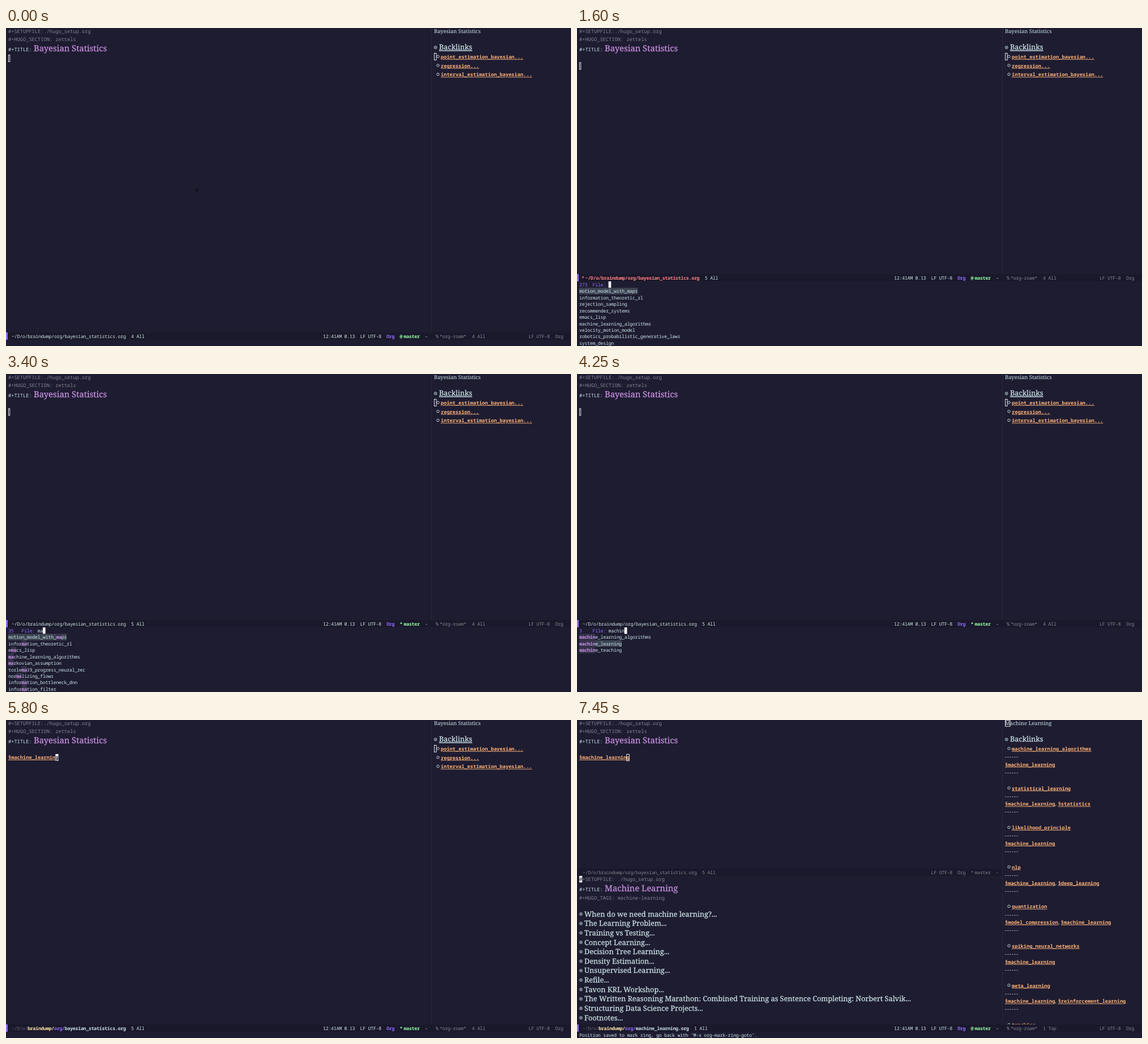
These frames come from a looping animation (998x561 px, 8.85 s). An HTML page:

```html
<!DOCTYPE html>
<html lang="en">
<head>
<meta charset="utf-8">
<title>Linking notes</title>
<style>
  html, body { margin: 0; width: 100%; height: 100%; overflow: hidden; background: #1e1c31; }
  svg { display: block; }
  #stage { width: 100%; height: 100%; }
  text { white-space: pre; fill: currentColor; color: #cbe3e7; text-rendering: geometricPrecision; }
  .code { font: 8.68px "Noto Sans Mono", monospace; }
  .ui { font: 8.3px "Noto Sans Mono", monospace; letter-spacing: -.29px; }
  .serif { font: 9.45px "Noto Serif", serif; }
  .rule { font: 9.45px "Noto Serif", serif; letter-spacing: 1.12px; }
  .head { font: 12.7px "Noto Serif", serif; stroke: currentColor; stroke-width: .25px; }
  .title { font: 14.8px "Noto Serif", serif; stroke: currentColor; stroke-width: .25px; }
  .bold { font-weight: 700; }
  .link { font-weight: 700; color: #ffb378; text-decoration: underline; text-decoration-skip-ink: none; }
  .line { text-decoration: underline; text-decoration-thickness: .7px; }
  .dim { color: #858392; }
  .faint { color: #636075; }
  .mauve { color: #c991e1; }
  .violet { color: #906cff; }
  .green { color: #95ffa4; }
  .yellow { color: #ffe9aa; }
  .red { color: #ff8080; }
  .dark { color: #1e1c31; }
  tspan { fill: currentColor; }
</style>
</head>
<body>
<svg id="stage" viewBox="0 0 998 561">
  <defs>
    <linearGradient id="glow">
      <stop offset="0" stop-color="#7f7f7f"/>
      <stop offset="1" stop-color="#1e1c31"/>
    </linearGradient>
  </defs>
</svg>
<script>
const LOOP = 8850;
const T = { newline: 50, prompt: 950, saved: 2400, type: 3300, insert: 4300, normal: 5600, open: 6050 };
const BG = '#1e1c31', BAR = '#1a182b', FG = '#cbe3e7', WHITE = '#f4f6f8';
const UI = 4.69, CODE = 5.208, ROW = 11.45;

const stage = document.getElementById('stage');
const scenes = [];

function el(parent, tag, attrs) {
  const node = document.createElementNS('http://www.w3.org/2000/svg', tag);
  for (const k in attrs) node.setAttribute(k, attrs[k]);
  parent.appendChild(node);
  return node;
}

// A group that is visible from one time to another
function scene(from, to) {
  const g = el(stage, 'g', {});
  scenes.push({ g, from, to });
  return g;
}

// content: a string, or a list of [class, string] runs
function text(g, x, y, cls, content) {
  const node = el(g, 'text', { x, y, class: cls });
  if (typeof content === 'string') node.textContent = content;
  else for (const [c, s] of content) el(node, 'tspan', { class: c }).textContent = s;
}

const rect = (g, x, y, width, height, fill) => el(g, 'rect', { x, y, width, height, fill });
const frame = (g, x, y, width, height) =>
  el(g, 'rect', { x, y, width, height, fill: 'none', stroke: WHITE, 'stroke-width': .9 });
const ring = (g, cx, cy, r) =>
  el(g, 'circle', { cx, cy, r, fill: 'none', stroke: FG, 'stroke-width': .9 });

function bullet(g, x, y) {
  ring(g, x, y, 2.4);
  el(g, 'circle', { cx: x, cy: y, r: .9, fill: FG });
}

function header(g, y, title) {
  text(g, 4, y, 'code', '#+TITLE:');
  text(g, 49, y - .2, 'title mauve', title);
}

// Mode lines
const DIR = '~/D/o/braindump/org/';
const pathStyles = {
  plain: f => [['', DIR + f]],
  dim: f => [['dim', DIR + f]],
  edited: f => [['red bold', DIR + f]],
  project: f => [['faint', '~/D/o/'], ['yellow bold', 'braindump/'], ['violet bold', 'org/'], ['bold', f]]
};

function leftBar(g, top, style, file, pos, mark) {
  const y = top + 9.9, edited = style === 'edited', off = style === 'dim';
  const tone = off ? 'ui dim' : 'ui';
  const x = edited ? 14.7 : 10;
  rect(g, 0, top, 751, 13, BAR);
  if (!off) {
    rect(g, 0, top, 3, 13, '#906cff');
    text(g, 560, y, tone, '12:41AM 0.13');
  }
  if (edited) text(g, 8, y, 'ui red bold', '*');
  text(g, x, y, 'ui', pathStyles[style](file));
  text(g, x + (DIR.length + file.length + 2) * UI, y, tone, pos);
  text(g, 625.5, y, tone, 'LF UTF-8');
  text(g, 672, y, off ? tone : 'ui violet bold', 'Org');
  text(g, 695.5, y, off ? tone : 'ui green bold', mark);
  text(g, 702.5, y, off ? tone : 'ui green bold', 'master');
  text(g, 740, y, tone, '-');
}

function rightBar(g, top, pos) {
  const y = top + 9.9;
  rect(g, 751, top, 247, 13, BAR);
  text(g, 759, y, 'ui dim', '%');
  text(g, 766, y, 'ui dim', '*org-roam*');
  text(g, 823, y, 'ui dim', pos);
  text(g, 923, y, 'ui dim', 'LF UTF-8');
  text(g, 970, y, 'ui dim', 'Org');
}

function bars(from, to, top, style, file, pos, mark, rightPos = '4 All') {
  const g = scene(from, to);
  rect(g, 0, top, 998, 561 - top, BG);
  leftBar(g, top, style, file, pos, mark);
  rightBar(g, top, rightPos);
}

// Completion prompt
function prompt(from, to, count, query, rows, selected = 0) {
  const g = scene(from, to), base = 455.8;
  text(g, 4, base, 'ui', [['violet', String(count).padEnd(5) + 'File: '], ['', query]]);
  rect(g, 4 + (11 + query.length) * UI, 447, UI, 11.5, WHITE);
  rows.forEach((row, i) => {
    const y = base + (i + 1) * ROW, at = row.indexOf(query), end = at + query.length;
    if (i === selected) rect(g, 4, y - 8.9, row.length * UI, ROW, '#3c4452');
    if (query) rect(g, 4 + at * UI, y - 8.9, query.length * UI, ROW, '#35324c');
    text(g, 4, y, 'ui', [['', row.slice(0, at)], ['mauve bold', query], ['', row.slice(end)]]);
  });
}

// Editor, always on screen
const base = scene(0, LOOP);
rect(base, 0, 0, 998, 561, BG);
rect(base, 751, 0, 1, 537, '#29273b');
text(base, 4, 9.1, 'code dim', '#+SETUPFILE:./hugo_setup.org');
text(base, 4, 22.6, 'code dim', '#+HUGO_SECTION: zettels');
header(base, 41, 'Bayesian Statistics');

const start = scene(0, T.newline);
frame(start, 4.5, 47.5, 2.3, 12);
el(start, 'path', { d: 'M337 281l1.5 3.5 3 1.8-3 1.7-1.5 3.5-1.5-3.5-3-1.7 3-1.8z', fill: '#141320' });
frame(scene(T.newline, T.insert), 4.5, 61, 2.3, 12);

text(scene(T.insert, LOOP), 4, 69.1, 'code link', '§machine_learning');
frame(scene(T.insert, T.normal), 93, 60.5, 2.3, 11.5);
const block = scene(T.normal, T.open), lastX = 4 + 16 * CODE;
rect(block, lastX, 60, CODE, 12, WHITE);
text(block, lastX, 69.1, 'code bold dark', 'g');
frame(scene(T.open, LOOP), lastX + .3, 60.5, 4.6, 11.5);

// Backlinks of the first note
const side = scene(0, T.open);
text(side, 756, 9.2, 'serif', 'Bayesian Statistics');
bullet(side, 758.7, 34.3);
text(side, 765, 38.4, 'head line', 'Backlinks');
frame(side, 756.5, 44.5, 3.6, 12);
['point_estimation_bayesian...', 'regression...', 'interval_estimation_bayesian...'].forEach((s, i) => {
  ring(side, 763, 50.3 + i * 15.7, 2.2);
  text(side, 768, 54 + i * 15.7, 'code link', s);
});

// Backlinks of the second note
const side2 = scene(T.open, LOOP);
text(side2, 756, 9.2, 'serif', 'Machine Learning');
frame(side2, 756.5, .5, 8.6, 10.8);
bullet(side2, 758.7, 34.3);
text(side2, 765, 38.4, 'head', 'Backlinks');
const ML = '§machine_learning';
[
  ['machine_learning_algorithms', ML],
  ['statistical_learning', ML, '§statistics'],
  ['likelihood_principle', ML],
  ['nlp', ML, '§deep_learning'],
  ['quantization', '§model_compression', ML],
  ['spiking_neural_networks', ML],
  ['meta_learning', ML, '§reinforcement_learning'],
  ['tracking']
].forEach(([name, a, b], i) => {
  const y = 54 + i * 69.6;
  ring(side2, 763, y - 3.7, 2.2);
  text(side2, 768, y, 'code link', name);
  if (!a) return;
  text(side2, 756, y + 14.2, 'rule', '------');
  text(side2, 756, y + 27.7, 'code link', a);
  text(side2, 756, y + 41.8, 'rule', '------');
  if (!b) return;
  const x = 756 + a.length * CODE;
  text(side2, x, y + 27.7, 'serif', ',');
  text(side2, x + 5.1, y + 27.7, 'code link', b);
});

// Second note in the lower window
const note = scene(T.open, LOOP);
leftBar(note, 262, 'dim', 'bayesian_statistics.org', '5 All', '*');
const beam = el(note, 'svg', { x: 4, y: 275, width: 188, height: 13 });
const glow = rect(beam, 0, 0, 188, 13, 'url(#glow)');
rect(note, 4, 275, CODE, 11.5, WHITE);
text(note, 4, 284, 'code', [['dark', '#'], ['dim', '+SETUPFILE: ./hugo_setup.org']]);
header(note, 302.2, 'Machine Learning');
text(note, 4, 317.1, 'code dim', '#+HUGO_TAGS: machine-learning');
[
  'When do we need machine learning?', 'The Learning Problem', 'Training vs Testing',
  'Concept Learning', 'Decision Tree Learning', 'Density Estimation', 'Unsupervised Learning',
  'Refile', 'Tavon KRL Workshop',
  'The Written Reasoning Marathon: Combined Training as Sentence Completing: Norbert Salvik',
  'Structuring Data Science Projects', 'Footnotes'
].forEach((s, i) => {
  const y = 342.3 + i * 16.64;
  bullet(note, 7, y);
  text(note, 13, y + 4.3, 'head', s + '...');
});

const BAYES = 'bayesian_statistics.org';
bars(0, T.newline, 537, 'plain', BAYES, '4 All', '@');
bars(T.newline, T.prompt, 537, 'edited', BAYES, '5 All', '@');
bars(T.prompt, T.saved, 434, 'edited', BAYES, '5 All', '@');
bars(T.saved, T.insert, 434, 'plain', BAYES, '5 All', '*');
bars(T.insert, T.normal, 537, 'edited', BAYES, '5 All', '*');
bars(T.normal, T.open, 537, 'project', BAYES, '5 All', '*');
bars(T.open, LOOP, 537, 'project', 'machine_learning.org', '1 All', '@', '1 Top');
text(scene(T.open, LOOP), 4, 558.6, 'ui',
  'Position saved to mark ring, go back with ‘M-x org-mark-ring-goto’.');

const machine = ['machine_learning_algorithms', 'machine_learning', 'machine_teaching'];
prompt(T.prompt, T.type, 273, '', [
  'motion_model_with_maps', 'information_theoretic_rl', 'rejection_sampling', 'recommender_systems',
  'emacs_lisp', 'machine_learning_algorithms', 'velocity_motion_model',
  'robotics_probabilistic_generative_laws', 'system_design'
]);
prompt(T.type, 3450, 35, 'ma', [
  'motion_model_with_maps', 'information_theoretic_rl', 'emacs_lisp', 'machine_learning_algorithms',
  'markovian_assumption', 'torlema19_progress_neural_rec', 'normalizing_flows',
  'information_bottleneck_dnn', 'information_filter'
]);
prompt(3450, 3500, 4, 'mac', ['emacs_lisp', ...machine]);
prompt(3500, 3550, 3, 'mach', machine);
prompt(3550, 3600, 3, 'machi', machine);
prompt(3600, 3750, 3, 'machin', machine);
prompt(3750, T.insert, 3, 'machin', machine, 1);

function draw(t) {
  for (const s of scenes) s.g.style.display = t >= s.from && t < s.to ? '' : 'none';
  // The glow holds for 300 ms, then slides out to the left one cell at a time
  const gone = Math.min(1, Math.max(0, (t - T.open - 300) / 300));
  glow.setAttribute('x', -Math.round(gone * 40) * UI - (gone === 1 ? 1 : 0));
}

const t0 = performance.now();
function tick() {
  draw((performance.now() - t0) % LOOP);
  requestAnimationFrame(tick);
}
tick();
</script>
</body>
</html>
```
